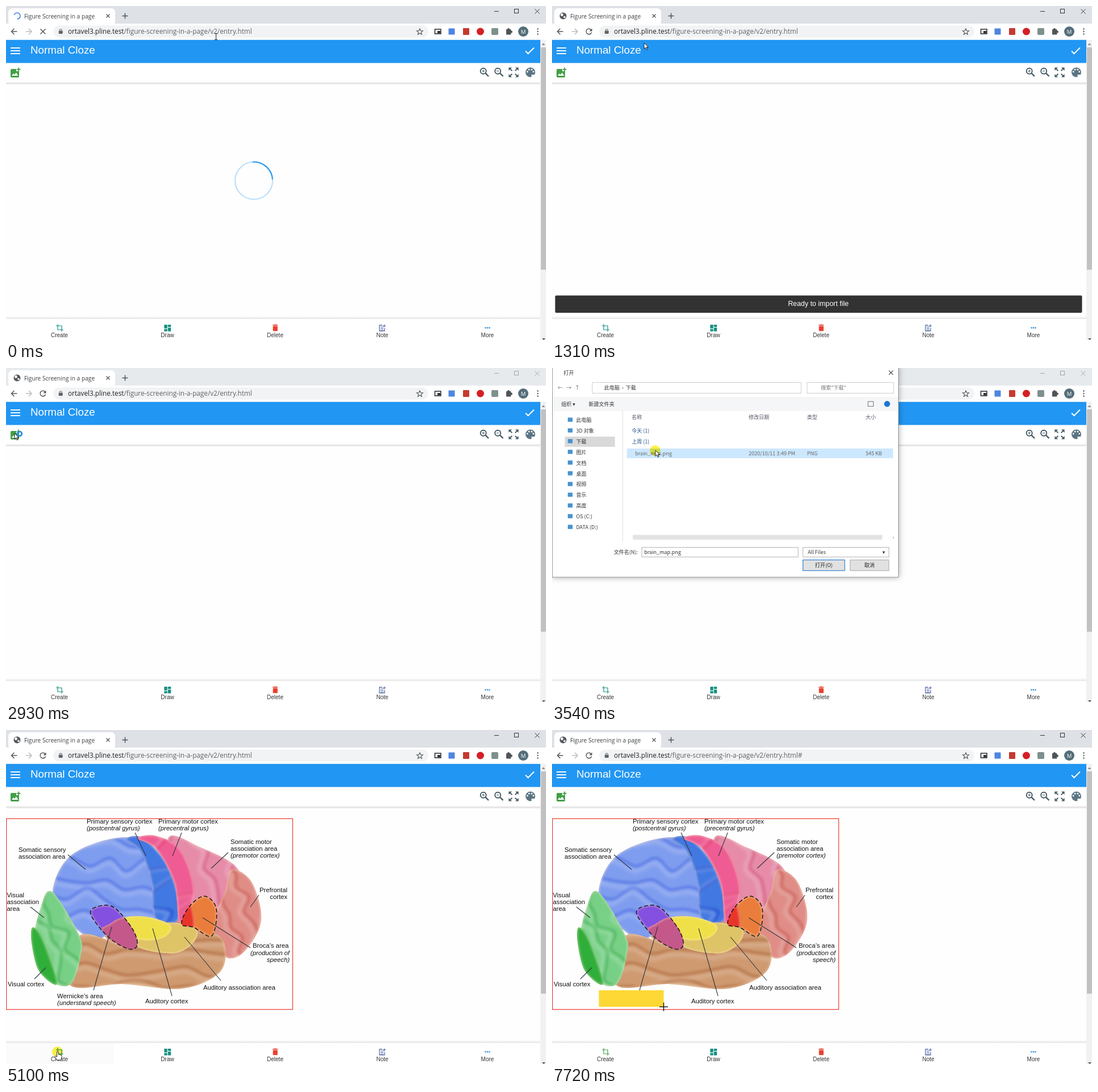
An HTML page with a canvas for the animation above (8000 ms loop, 950 by 589 pixels).

```html
<!DOCTYPE html>
<html lang="en">
<head>
<meta charset="utf-8">
<title>Figure Screening in a page</title>
<style>
html, body { margin: 0; width: 100%; height: 100%; overflow: hidden; background: #fff; }
canvas { display: block; width: 950px; height: 589px; }
</style>
</head>
<body>
<canvas id="stage" width="950" height="589"></canvas>
<script>
const LOOP = 8000;
const TAU = Math.PI * 2;
const ARIAL = '"Liberation Sans", Arial, sans-serif';
const UI = '"Open Sans", "Noto Sans", sans-serif';
const CJK = '"Noto Sans CJK SC", "Noto Sans CJK", sans-serif';
const stage = document.getElementById('stage').getContext('2d');
let ctx = stage;

// Drawing helpers
function box(color, x, y, w, h, r = 0) {
  ctx.fillStyle = color;
  ctx.beginPath();
  ctx.roundRect(x, y, w, h, r);
  ctx.fill();
}
function frame(color, x, y, w, h, lw = 1) {
  ctx.strokeStyle = color;
  ctx.lineWidth = lw;
  ctx.strokeRect(x, y, w, h);
}
function disc(color, x, y, r) {
  ctx.fillStyle = color;
  ctx.beginPath();
  ctx.arc(x, y, r, 0, TAU);
  ctx.fill();
}
function arc(color, lw, x, y, r, from = 0, to = TAU) {
  ctx.strokeStyle = color;
  ctx.lineWidth = lw;
  ctx.beginPath();
  ctx.arc(x, y, r, from, to);
  ctx.stroke();
}
function trace(p) {
  ctx.beginPath();
  for (let i = 0; i < p.length; i += 2) ctx.lineTo(p[i], p[i + 1]);
}
function line(color, lw, ...p) {
  ctx.strokeStyle = color;
  ctx.lineWidth = lw;
  trace(p);
  ctx.stroke();
}
function poly(color, ...p) {
  ctx.fillStyle = color;
  trace(p);
  ctx.fill();
}
function text(str, x, y, font, color, align = 'left') {
  ctx.font = font;
  ctx.fillStyle = color;
  ctx.textAlign = align;
  ctx.fillText(str, x, y);
}
function shadow(y0, y1, a, b) {
  const g = ctx.createLinearGradient(0, y0, 0, y1);
  g.addColorStop(0, `rgba(0,0,0,${a})`);
  g.addColorStop(1, `rgba(0,0,0,${b})`);
  ctx.fillStyle = g;
  ctx.fillRect(0, y0, 940, y1 - y0);
}

// Icons
function plus(color, lw, x, y, r) {
  line(color, lw, x - r, y, x + r, y);
  line(color, lw, x, y - r, x, y + r);
}
function cross(color, lw, x, y, r) {
  line(color, lw, x - r, y - r, x + r, y + r);
  line(color, lw, x - r, y + r, x + r, y - r);
}
function arrow(color, x, y, dir) {
  line(color, 1.5, x - 5 * dir, y, x + 4.5 * dir, y);
  line(color, 1.5, x, y - 5, x + 5 * dir, y, x, y + 5);
}
function star(color, x, y) {
  const p = [];
  for (let i = 0; i <= 10; i++) {
    const a = i * TAU / 10 - TAU / 4, r = i % 2 ? 2.5 : 5.8;
    p.push(x + r * Math.cos(a), y + r * Math.sin(a));
  }
  line(color, 1.1, ...p);
}
function lens(color, x, y) {
  arc(color, 1.9, x - 2.3, y - 2.3, 5);
  line(color, 2.4, x + 1.6, y + 1.6, x + 7, y + 7);
}
function expand(color, x, y) {
  for (const i of [-1, 1]) for (const j of [-1, 1]) {
    poly(color, x + 8.6 * i, y + 8.6 * j, x + 2.9 * i, y + 8.6 * j, x + 8.6 * i, y + 2.9 * j);
    line(color, 1.9, x + 6 * i, y + 6 * j, x + 2.6 * i, y + 2.6 * j);
  }
}
function palette(color, x, y) {
  disc(color, x, y, 8.5);
  for (let i = 0; i < 4; i++) {
    const a = Math.PI * (1.06 + i * 0.293);
    disc('#fff', x + 5.4 * Math.cos(a), y + 5.4 * Math.sin(a), 1.4);
  }
  poly('#fff', x + 2, y + 9, x + 2, y + 4, x + 9, y + 4, x + 9, y + 9);
}

// Timing helpers
const clamp = v => Math.max(0, Math.min(1, v));
const span = (t, a, b) => clamp((t - a) / (b - a));
const mix = (a, b, k) => a + (b - a) * k;
const within = (t, a, b) => t >= a && t < b;
const easeOut = k => 1 - (1 - k) ** 3;
const easeInOut = k => k * k * (3 - 2 * k);

function seeded(seed) {
  return () => {
    const v = Math.sin(seed++ * 12.9898) * 43758.5453;
    return v - Math.floor(v);
  };
}

// Catmull-Rom curve through flat x,y pairs.
function smooth(p, closed) {
  const n = p.length / 2;
  const at = i => {
    const j = closed ? (i + n) % n : Math.max(0, Math.min(n - 1, i));
    return [p[2 * j], p[2 * j + 1]];
  };
  const path = new Path2D();
  path.moveTo(p[0], p[1]);
  for (let i = 0; i < (closed ? n : n - 1); i++) {
    const [a, b, c, d] = [at(i - 1), at(i), at(i + 1), at(i + 2)];
    path.bezierCurveTo(
      b[0] + (c[0] - a[0]) / 6, b[1] + (c[1] - a[1]) / 6,
      c[0] - (d[0] - b[0]) / 6, c[1] - (d[1] - b[1]) / 6, c[0], c[1]);
  }
  if (closed) path.closePath();
  return path;
}

function blurred(path, color, width, blur) {
  ctx.filter = `blur(${blur}px)`;
  ctx.strokeStyle = color;
  ctx.lineWidth = width;
  ctx.stroke(path);
  ctx.filter = 'none';
}

// A lobe with a pale rim; its wavy folds run along the given angle.
function lobe(color, pts, folds = 0, angle = 0) {
  const path = smooth(pts, true);
  const xs = pts.filter((v, i) => i % 2 === 0), ys = pts.filter((v, i) => i % 2);
  const [x0, x1, y0, y1] = [Math.min(...xs), Math.max(...xs), Math.min(...ys), Math.max(...ys)];
  const reach = Math.hypot(x1 - x0, y1 - y0) / 2;
  const across = (Math.abs(Math.sin(angle)) * (x1 - x0) + Math.abs(Math.cos(angle)) * (y1 - y0)) / 2;
  const rnd = seeded(x0 + y1);
  ctx.save();
  ctx.fillStyle = color;
  ctx.fill(path);
  ctx.clip(path);
  ctx.translate((x0 + x1) / 2, (y0 + y1) / 2);
  ctx.rotate(angle);
  for (let i = 0; i < folds; i++) {
    const base = across * ((2 * i + 1) / folds - 1);
    const wave = [];
    for (let k = -4; k <= 4; k++) wave.push(k * reach / 4, base + (rnd() - 0.5) * across / folds * 1.9);
    const fold = smooth(wave, false);
    ctx.globalCompositeOperation = 'multiply';
    ctx.globalAlpha = 0.5;
    blurred(fold, color, 5, 2);
    ctx.globalCompositeOperation = 'source-over';
    ctx.globalAlpha = 0.2;
    ctx.translate(0, 9);
    blurred(fold, '#fff', 7, 3);
    ctx.translate(0, -9);
  }
  ctx.restore();
  ctx.save();
  ctx.clip(path);
  blurred(path, 'rgba(255,232,205,.38)', 4, 1.5);
  ctx.restore();
  return path;
}

// A dashed area in two colours, split along a tinted lower part.
function dashedArea(base, tint, outline, part) {
  const path = lobe(base, outline);
  ctx.save();
  ctx.clip(path);
  lobe(tint, part);
  ctx.setLineDash([7, 4]);
  ctx.restore();
  ctx.save();
  ctx.setLineDash([7, 4]);
  ctx.strokeStyle = '#161616';
  ctx.lineWidth = 1.5;
  ctx.stroke(path);
  ctx.restore();
}

// Stacked label lines with a leader; bracketed parts are italic.
function note(str, x, y, leader, align) {
  let slant = false;
  line('#30363c', 1.1, ...leader);
  str.split('|').forEach((s, i) => {
    slant = slant || s[0] === '(';
    text(s, x, y + 12.2 * i, (slant ? 'italic ' : '') + '11.3px ' + ARIAL, '#111', align);
  });
}

function paintBrain() {
  const cv = document.createElement('canvas');
  cv.width = 510;
  cv.height = 500;
  ctx = cv.getContext('2d');

  lobe('#cf8f7c', [150,330, 210,250, 330,215, 395,275, 380,370, 250,410]);
  lobe('#e68ca9', [285,191, 340,206, 410,249, 385,320, 330,350, 302,290], 4, 1.2);
  lobe('#df8d86', [396,246, 432,268, 449,335, 420,390, 386,400, 362,350, 385,285], 4, 1.3);
  lobe('#7f9def', [82,288, 110,225, 180,193, 240,198, 264,270, 268,337, 205,337, 160,370, 110,338], 6, 0.15);
  lobe('#4278e2', [212,193, 240,190, 282,235, 304,300, 300,338, 262,331, 256,270, 237,215], 1, 1.2);
  lobe('#ee5c93', [231,191, 265,187, 308,213, 331,285, 306,341, 296,270, 264,210], 1, 1.2);
  lobe('#cf9a70', [130,362, 225,381, 335,357, 381,370, 378,425, 310,456, 205,448, 112,449], 4, 0.05);
  lobe('#78d087', [82,286, 128,360, 132,395, 114,448, 78,441, 48,385, 62,310], 4, 1.1);
  lobe('#2fae3a', [47,348, 65,370, 90,447, 58,425, 45,375]);
  lobe('#dfc367', [265,342, 330,346, 332,372, 295,394, 230,380]);
  lobe('#efe04a', [200,335, 245,329, 290,345, 275,367, 230,368]);
  dashedArea('#8350e0', '#c4588a',
    [149,325, 162,311, 190,313, 222,350, 231,379, 215,386, 180,365],
    [168,358, 182,342, 212,332, 245,370, 215,400]);
  dashedArea('#ea7d3c', '#e8352a',
    [309,342, 322,312, 349,293, 370,315, 362,363, 330,348],
    [295,345, 320,304, 331,335, 325,360]);

  note('Primary sensory cortex|(postcentral gyrus)', 142, 165, [227, 181, 246, 222]);
  note('Primary motor cortex|(precentral gyrus)', 268, 165, [309, 181, 293, 222]);
  note('Somatic motor|association area|(premotor cortex)', 395, 201, [391, 216, 361, 244]);
  note('Somatic sensory|association area', 22, 215, [109, 220, 140, 246]);
  note('Prefrontal|cortex', 495, 286, [445, 291, 430, 312], 'right');
  note('Visual|association|area', 1.5, 295, [43, 312, 67, 331]);
  note('Broca’s area', 434, 384, [430, 384, 346, 331]);
  note('(production of|speech)', 499, 397, [], 'right');
  note('Visual cortex', 3, 452, [50, 439, 70, 419]);
  note('Wernicke’s area|(understand speech)', 90, 473, [154, 459, 186, 347]);
  note('Auditory association area', 347, 458, [378, 442, 314, 365]);
  note('Auditory cortex', 245, 482, [292, 469, 258, 350]);
  ctx = stage;
  return cv;
}
const brain = paintBrain();

function browser(t) {
  const idle = within(t, 2460, 3640);
  const loading = t < 790;
  const ink = idle ? '#a3a5a8' : '#333', gray = '#505459';
  box(idle ? '#e7eaed' : '#dee1e6', 0, 0, 950, 31);
  box('#fff', 4, 4, 188, 30, 7);
  box('#fff', 0, 31, 950, 28.5);
  if (loading) {
    const a = t / 1000 * TAU;
    arc('#3f86e8', 1.6, 19.5, 17.5, 5.5, a - 2.8, a + 1.5);
  } else {
    disc('#55595e', 19.5, 17.5, 6);
    disc('#fff', 17.5, 15.5, 2.4);
    disc('#fff', 22, 19.5, 1.8);
  }
  text('Figure Screening in a page', 32, 21.5, '10.2px ' + UI, '#3c4043');
  cross(gray, 1.3, 179.5, 17.5, 3);
  plus(gray, 1.5, 209.5, 17.5, 5);
  line(ink, 1, 859, 9.5, 867, 9.5);
  frame(ink, 894.5, 5.5, 7, 7);
  cross(ink, 1, 934.5, 9.5, 4);

  arrow(gray, 14.5, 45, -1);
  arrow('#babcbe', 40, 45, 1);
  if (loading) cross(gray, 1.5, 65, 45, 4.5);
  else {
    arc(gray, 1.5, 65, 45, 4.8, 0.3, 5.5);
    poly(gray, 70.5, 39.5, 70.5, 44.5, 65.5, 44.5);
  }
  box('#f1f3f4', 83, 34.5, 660, 21, 10.5);
  box('#5f6368', 92.7, 43.5, 7, 5.5, 1);
  arc('#5f6368', 1.1, 96.2, 43, 2, Math.PI, TAU);
  const font = '11.75px ' + UI, host = 'ortavel3.pline.test';
  text(host, 109, 49, font, '#202124');
  const path = '/figure-screening-in-a-page/v2/entry.html' + (t >= 5250 ? '#' : '');
  text(path, 109 + ctx.measureText(host).width, 49, font, '#5f6368');
  star(gray, 728, 45.5);
  frame('#303438', 754.5, 41, 10.5, 8, 1.6);
  box('#303438', 759, 44, 5, 4);
  box('#4f86e0', 778.5, 39.5, 11, 11, 1);
  box('#c63a30', 804, 39, 11, 12, 1);
  disc('#d51f26', 834.5, 45, 6.5);
  box('#7d908c', 854, 39, 12, 12, 2);
  box(gray, 880, 41, 8.5, 9.5, 1);
  disc(gray, 884, 41, 2);
  disc(gray, 889, 45.5, 2);
  disc('#546e7a', 910, 45, 9);
  text('M', 910, 48.5, '9.5px ' + UI, '#fff', 'center');
  for (let i = -1; i < 2; i++) disc(gray, 935.5, 45 + 4.5 * i, 1.2);
}

function page(t) {
  const slate = '#455a64', green = '#43a047';
  box('#fefefe', 0, 59, 940, 530);
  shadow(135, 139.5, 0.14, 0);
  box('#fff', 0, 100, 940, 35);
  box('#2196f3', 0, 59.5, 940, 41);
  for (let i = -1; i < 2; i++) box('#fff', 8, 78 + 5 * i, 17, 1.9);
  text('Normal Cloze', 43, 84.2, '18.8px ' + ARIAL, '#fff');
  line('#fff', 2, 914, 79.5, 918.5, 84, 929, 73.5);

  box(green, 8, 111, 15, 15, 2);
  box('#fff', 18, 107, 8, 8);
  plus(green, 1.8, 22.2, 111.8, 3.3);
  poly('#fff', 10, 123, 13, 119, 15, 121, 18, 117.5, 21.5, 123);
  lens(slate, 842, 117);
  plus(slate, 1, 839.7, 114.7, 2.4);
  lens(slate, 867.5, 117);
  line(slate, 1, 862.8, 114.7, 867.6, 114.7);
  expand(slate, 893, 117);
  palette('#5b7583', 922.5, 117);

  if (t >= 3640) {
    ctx.drawImage(brain, 0, 0);
    frame('#f0443a', 0.6, 156.4, 503.8, 336.4, 1.3);
  }
  if (t < 780) {
    const a = t / 2000 * TAU;
    arc('#bbdefb', 2.2, 436, 308, 33);
    arc('#2e9af0', 2.2, 436, 308, 33, a - 1.64, a - 0.07);
  }
}

function bottomBar(t) {
  const teal = '#159080', red = '#e8402f', blue = '#5a6fa8';
  shadow(547, 552, 0, 0.1);
  box('#fff', 0, 552, 940, 37);
  if (within(t, 3920, 5560)) box('#fbfbfb', 0, 552, 190, 37);

  const crop = t < 7640 ? teal : '#43a047';
  line(crop, 1.2, 91, 561, 91, 571, 101, 571);
  line(crop, 1.2, 88, 564, 98, 564, 98, 574);
  for (const [x, y, tall, low] of [[278.3, 562, 6.5, 4], [284.8, 562, 4, 6.5]]) {
    box(teal, x, y, 5.4, tall);
    box(teal, x, y + tall + 1.2, 5.4, low);
  }
  box(red, 469, 562.3, 9.4, 1.4);
  box(red, 471.5, 561.5, 4.4, 1.2);
  box(red, 469.6, 564.4, 8.2, 8.8, 1);
  line(blue, 1.3, 662, 563, 657, 563, 657, 573, 666, 573, 666, 568);
  for (let i = 0; i < 3; i++) line(blue, 1, 659, 566 + 2.5 * i, 664, 566 + 2.5 * i);
  plus(blue, 1.2, 665.5, 564, 2.5);
  for (let i = -1; i < 2; i++) disc('#2f8fd8', 847 + 3.5 * i, 567.5, 1.3);
  const names = { Create: 94, Draw: 284, Delete: 473.5, Note: 662, More: 847 };
  for (const s in names) text(s, names[s], 584, '10px ' + ARIAL, '#333', 'center');
}

function scrollbar() {
  box('#f1f1f1', 940, 59, 10, 530);
  box('#c1c1c1', 941, 73, 9, 392);
  poly('#8a8a8a', 942.5, 69, 948.5, 69, 945.5, 65.5);
  poly('#505050', 943, 586, 949, 586, 946, 589);
}

function toast(t) {
  if (!within(t, 800, 2230)) return;
  const show = easeOut(span(t, 850, 1160));
  const hide = easeOut(span(t, 1850, 2225));
  ctx.save();
  ctx.globalAlpha = mix(0.46, 1, show) * (1 - hide);
  ctx.translate(0, 25.6 * (1 - show) - 36 * hide);
  box('#323232', 5.5, 510.5, 927, 30.5, 2);
  text('Ready to import file', 468.5, 529, '12.4px ' + ARIAL, '#fff', 'center');
  ctx.restore();
}

function button(s, x, w, rim) {
  box('#e1e1e1', x, 331, w, 18);
  frame(rim, x, 331, w, 18);
  text(s, x + w / 2, 343.2, '8.6px ' + CJK, '#222', 'center');
}

function dialog(t) {
  if (!within(t, 3010, 3850)) return;
  const picked = t >= 3470, shut = span(t, 3560, 3710), zoom = 1.05 - 0.05 * shut;
  const put = (s, x, y, color = '#333') => text(s, x, y + 3.2, '8.6px ' + CJK, color);
  const row = (y, color, cells) => cells.forEach((s, i) => put(s, 148 + (i && 98 + 98 * i), y, color));
  ctx.save();
  ctx.globalAlpha = mix(1, 0.06, shut) * (1 - span(t, 3720, 3840));
  ctx.translate(305, 182);
  ctx.scale(zoom, zoom);
  ctx.translate(-305, -182);
  ctx.shadowColor = 'rgba(0,0,0,.35)';
  ctx.shadowBlur = 10;
  box('#fff', 15, 5, 580, 355);
  ctx.shadowColor = 'transparent';
  frame('#9a9a9a', 15, 5, 580, 355);
  put('打开', 34, 17);
  cross('#333', 1, 582.5, 16.5, 3.5);
  put('←   →   ↑', 24, 42, '#666');
  frame('#d0d0d0', 82, 33, 350, 18);
  put('此电脑  ›  下载', 102, 42);
  frame('#d0d0d0', 442, 33, 145, 18);
  put('搜索"下载"', 465, 42, '#777');
  box('#f5f6f7', 15.5, 57, 579, 24);
  put('组织 ▾', 30, 69);
  put('新建文件夹', 76, 69);
  frame('#777', 544, 65, 9, 8);
  disc('#1976d2', 576, 69, 5);

  line('#e2e2e2', 1, 133, 81, 133, 300);
  box('#d9d9d9', 36, 124, 84, 17);
  const places = '此电脑|3D 对象|下载|图片|文档|桌面|视频|音乐|高度|OS (C:)|DATA (D:)';
  places.split('|').forEach((s, i) => {
    box('#4793d2', 41, 92 + 18 * i, 8, 7);
    put(s, 55, 96 + 18 * i);
  });
  if (picked) box('#cce8ff', 140, 144, 446, 16);
  row(91, '#556', ['名称', '修改日期', '类型', '大小']);
  row(114, '#26518a', ['今天 (1)']);
  row(132, '#26518a', ['上周 (1)']);
  row(152, '#666', ['   brain_map.png', '2020/10/11 3:49 PM', 'PNG', '545 KB']);
  box('#e3e3e3', 150, 289, 418, 8);
  put('›', 585, 293, '#666');
  put('文件名(N):', 118, 318);
  frame('#b5b5b5', 165, 310, 262, 16);
  frame('#b5b5b5', 435, 310, 144, 16);
  put('All Files', 443, 318);
  put('▾', 568, 318);
  if (picked) put('brain_map.png', 169, 318);
  else if (t < 3240) line('#000', 1, 168, 312.5, 168, 323.5);
  button('打开(O)', 435, 70, '#1976d2');
  button('取消', 514, 65, '#adadad');
  ctx.restore();
}

// Each leg: start, end, goal x, goal y.
const LEGS = [
  [1460, 2230, 15, 115],
  [3390, 3540, 182, 145],
  [3740, 3920, 96, 562],
  [4090, 4240, 91, 567],
  [5400, 6020, 82.5, 459],
  [6500, 7340, 196.5, 488.2]
];
const CLICKS = [2310, 3540, 5100, 6330, 7640];
const ARROW = new Path2D('M0 0V10.5L2.5 8.2 4.3 12.2 6 11.4 4.2 7.6H7.6Z');
const HAND = new Path2D('M-1.4 .5Q0-1 1.4 .5V5L6 6.2Q7.5 7 7.2 9.5L5.5 15H-1.5L-5 9.5Q-5 7.5-3.4 8L-1.4 9.5Z');

function mouse(t) {
  let x = 162, y = 65;
  for (const [from, to, gx, gy] of LEGS) {
    const k = easeInOut(span(t, from, to));
    x = mix(x, gx, k);
    y = mix(y, gy, k);
  }
  return [x, y];
}

function pointer(t, x, y) {
  if (t < 1310) {
    line('#222', 1, 369.5, 49, 369.5, 59);
    for (const end of [48.5, 59.5]) line('#222', 1, 367, end, 372, end);
    return;
  }
  if (CLICKS.some(c => within(t, c, c + 75))) {
    ctx.globalCompositeOperation = 'multiply';
    disc('#fff04a', x - 0.5, y + 0.5, 9.3);
    ctx.globalCompositeOperation = 'source-over';
  }
  if (within(t, 3620, 3800)) {
    arc('#2a8fe0', 3.4, x, y, 4.7);
    return;
  }
  if (t >= 5650) {
    plus('#000', 1.3, x, y, 7.5);
    return;
  }
  if (within(t, 2460, 3010)) arc('#2a8fe0', 2.8, x + 9, y + 1, 3.8);
  const shape = t >= 3900 ? HAND : ARROW;
  ctx.save();
  ctx.translate(x, y);
  ctx.fillStyle = '#fff';
  ctx.strokeStyle = '#111';
  ctx.lineWidth = 0.9;
  ctx.fill(shape);
  ctx.stroke(shape);
  ctx.restore();
}

function draw() {
  const t = performance.now() % LOOP;
  const [x, y] = mouse(t);
  page(t);
  if (t >= 6500) box('#fdd835', 82.5, 459, x - 82.5, y - 459);
  bottomBar(t);
  scrollbar();
  browser(t);
  toast(t);
  dialog(t);
  pointer(t, x, y);
  requestAnimationFrame(draw);
}
draw();
</script>
</body>
</html>
```
